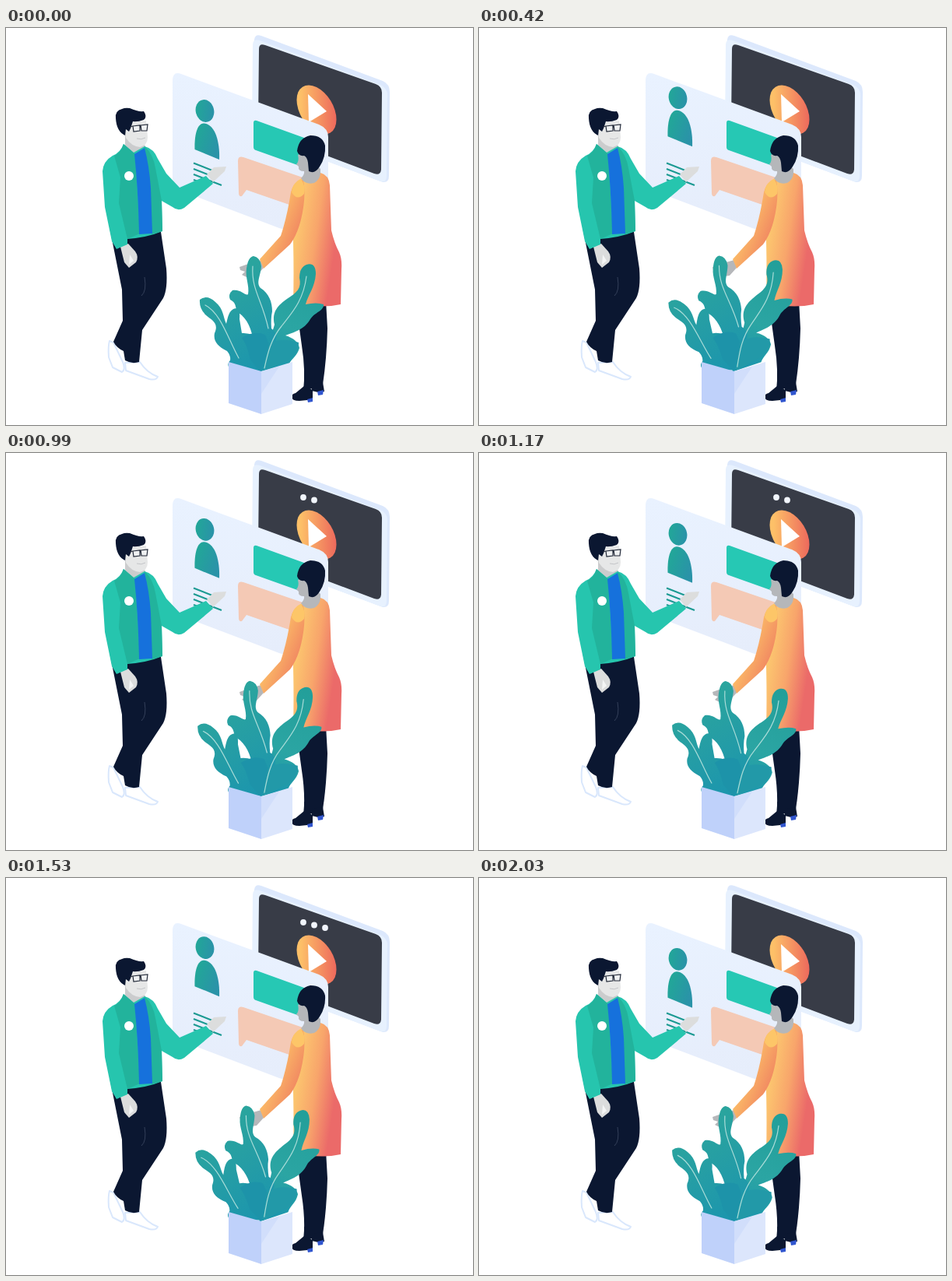
Write an HTML page that moves like this. It is 600 px wide and 510 px high and loops after 2090 ms.

```html
<!DOCTYPE html>
<html lang="en">
<head>
<meta charset="utf-8">
<title>Presentation</title>
<style>
html, body { margin: 0; width: 100%; height: 100%; overflow: hidden; background: #fff; }
svg { display: block; width: 100%; height: 100%; }
.navy { fill: #0b1731; }
.skin { fill: #dcdddd; }
.shade { fill: #b5b7ba; }
.vein { fill: none; stroke: #a9dcd8; stroke-width: 1.2; stroke-linecap: round; }
</style>
</head>
<body>
<svg viewBox="0 0 600 510">
  <defs>
    <linearGradient id="play" x1="0" y1="0" x2="1" y2="0">
      <stop offset=".1" stop-color="#fdc068"/><stop offset="1" stop-color="#ed695c"/>
    </linearGradient>
    <linearGradient id="avatarFill" x1="0" y1="0" x2="1" y2=".5">
      <stop offset=".1" stop-color="#21a897"/><stop offset="1" stop-color="#2a93a8"/>
    </linearGradient>
    <linearGradient id="dress" gradientUnits="userSpaceOnUse" x1="366" y1="255" x2="432" y2="265">
      <stop offset=".1" stop-color="#fcc76f"/><stop offset=".5" stop-color="#f8a56b"/><stop offset=".9" stop-color="#eb6a69"/>
    </linearGradient>
    <linearGradient id="sleeve" gradientUnits="userSpaceOnUse" x1="345" y1="240" x2="384" y2="256">
      <stop offset="0" stop-color="#fcbf67"/><stop offset="1" stop-color="#f08261"/>
    </linearGradient>
    <linearGradient id="leaf" gradientUnits="userSpaceOnUse" x1="270" y1="310" x2="340" y2="435">
      <stop offset="0" stop-color="#2ba69c"/><stop offset=".5" stop-color="#259da5"/><stop offset="1" stop-color="#1b95ae"/>
    </linearGradient>
    <linearGradient id="leafRight" gradientUnits="userSpaceOnUse" x1="390" y1="310" x2="335" y2="430">
      <stop offset="0" stop-color="#239f9a"/><stop offset=".6" stop-color="#2ba5a3"/><stop offset="1" stop-color="#1d97ac"/>
    </linearGradient>
    <linearGradient id="glass" x1="0" y1="0" x2="0" y2="1">
      <stop offset="0" stop-color="#e9f2ff"/><stop offset="1" stop-color="#e6edfb"/>
    </linearGradient>
  </defs>

  <g id="screen">
    <path fill="#dce8fc" d="M319 15Q320 7 328 10L484 68Q493 72 493 82L492 190Q492 199 484 198L322 137Z"/>
    <path fill="#e7f1fe" d="M317 22Q317 13 326 16L481 73Q490 77 490 86L489 190Q489 199 481 197L322 137Q316 134 316 127Z"/>
    <path fill="#383c47" d="M325 27Q325 19 333 22L475 72Q483 75 483 83L482 182Q481 190 473 187L330 133Q324 130 324 124Z"/>
    <circle r="1" fill="url(#play)" transform="matrix(25.5 12.5 0 29 399 105)"/>
    <path fill="#fff" d="M388 85L412 107L389 121Z"/>
    <g id="dots" fill="#f1f5fc">
      <circle cx="382" cy="57" r="3.9"/><circle cx="396" cy="60.5" r="3.9"/><circle cx="410" cy="64" r="3.9"/>
    </g>
  </g>

  <g id="panel">
    <path fill="url(#glass)" d="M214 68Q214 55 225 59L402 124Q414 129 414 140V244L366 252Q363 261 351 257L222 208Q214 204 214 194Z"/>
    <path fill="#26c8b4" d="M318 122Q318 118 322 119L394 145V183L321 157Q318 156 318 153Z"/>
    <path fill="#f4c9b5" d="M298 171Q298 164 305 166L390 195V236L309 208L303 216Q299 217 299 212Z"/>
    <path fill="none" stroke="#1b9a92" stroke-width="2.200" d="M241 173.500L265 183M241 181L268 191.500M241 188L277 202M241 195L249 198"/>
    <g id="avatar" fill="url(#avatarFill)">
      <ellipse cx="255.500" cy="106.500" rx="11.700" ry="14.500" transform="rotate(-14 255.500 106.500)"/>
      <path d="M242.500 156C242 142 244 123 254 122.500C268 123 275 145 274 169Z"/>
    </g>
  </g>

  <g id="woman">
    <path class="shade" d="M328 298L314 302L300 307L301 311L307 313L303 317L309 320L322 318L331 308Z"/>
    <path class="navy" d="M372 350H411L413 386Q412 425 407 458L394 463L382 466Q385 440 380 408Z"/>
    <path class="navy" d="M367 474Q367 470 372 469L383 460L394 465V477L387 478L377 479Q367 479 367 474ZM393 457L407 455L409 467L401 468L393 466Z"/>
    <path fill="#3156cf" d="M387 477L394 475V480L388 481ZM400 467L408 465L407 471L401 472Z"/>
    <path fill="url(#dress)" d="M380 193Q394 190 404 186Q415 189 416 202L418 260Q422 277 428 288Q432 297 431 310L430 355Q403 361 369 353Q370 315 369 275L366 213Q368 198 380 193Z"/>
    <path fill="url(#sleeve)" d="M366 211Q370 196 382 195Q386 217 379 246Q374 266 365 278L331 309L326 297L353 267Q361 243 366 211Z"/>
    <path fill="#fdc668" d="M367 211Q367 201 379 194Q385 202 383 213Q374 223 367 211Z"/>
    <path class="shade" d="M375 163Q384 158 396 174L404 181V187Q403 195 396 199Q385 202 379 193Q384 188 383 184Q375 184 376 178L373 175Q377 171 375 163Z"/>
    <path class="navy" d="M374 158Q376 141 391 138Q407 138 410 151Q411 166 403 178Q397 188 389 184L388 173Q387 166 383 164Q376 165 374 158Z"/>
  </g>

  <g id="plant">
    <path fill="url(#leafRight)" d="M388 303.500Q398 302 398 316C397 333 388 343 385 355Q399 352 408 355C409 363 397 365 391 374C383 388 369 391 359 395Q375 400 377 411C374 422 366 425 363 433L325 443L333 403Q343 391 345 381C341 364 350 356 361 348C374 340 380 334 377 321Q377 306 388 303.500Z"/>
    <path fill="url(#leaf)" d="M249 349Q258 342 269 352C280 361 279 372 283 380C285 373 286 360 297 360Q301 362 300 374L303 392Q318 391 325 402L330 441L293 440C284 437 284 431 288 427Q289 421 284 415C272 409 266 402 268 392C274 379 264 375 257 369Q248 361 249 349Z"/>
    <path fill="url(#leaf)" d="M318 293Q327 295 328 306C327 319 321 327 327 334C338 341 342 352 342 364Q340 373 341 386Q349 392 347 401L328 442L318 403C316 388 310 373 299 366C293 361 298 354 288 349Q285 342 291 337C302 335 308 345 311 342C313 331 307 320 309 309Q311 294 318 293Z"/>
    <path fill="#1d93a9" d="M303 398Q319 388 333 394L339 410L327 442L314 426Q309 405 303 398Z"/>
    <path fill="#2299a8" d="M338 405Q355 397 376 404Q377 415 366 425L329 442Z"/>
    <path class="vein" d="M317 306C315 336 329 349 337 386M256 356C276 366 286 401 299 424M386 319C382 351 367 366 354 383C340 400 336 419 332 437"/>
  </g>
  <path fill="#bfd1fa" d="M286 429L328 441V496L286 482Z"/>
  <path fill="#dce6fc" d="M328 441L368 429V483L328 496Z"/>
  <path fill="#d1defb" d="M328 470L351 435L328 441Z"/>

  <g id="man">
    <g fill="#fff" stroke="#d9e7fc" stroke-width="2" stroke-linejoin="round">
      <path d="M133 402Q131 408 132 423L137 436L149 442Q154 439 150 429L138 404Z"/>
      <path d="M153 430L172 429Q181 443 195 448Q193 453 184 451L154 440Z"/>
    </g>
    <path class="navy" d="M133 256L199 262L206 309Q208 335 202 347L175 388L171 429Q162 432 153 427L151 415Q142 411 138 403L150 376L149 336Z"/>
    <path fill="none" stroke="#34405a" d="M178 320Q181 338 174 344"/>
    <path class="skin" d="M147 281L157 277L166 287Q171 294 167 301L158 308L152 301Z"/>
    <path fill="#f4f5f5" d="M159 291L164 299L158 304Z"/>
    <path fill="#cbcccd" d="M153 132L166 143L179 151L177 159L165 162L153 153Z"/>
    <path fill="#26c5ae" d="M151 149L164 160L178 152Q190 155 195 168L206 187L223 205L257 190L266 200L229 231Q221 236 214 230L200 222L201 261Q182 269 156 271V278L142 284L136 274L127 230L124 184Q125 171 137 164Q147 160 151 149Z"/>
    <path fill="#22b39c" d="M151 149L166 162L172 264L156 271L145 225L147 192L139 164Q148 160 151 149ZM178 152Q189 162 192 180L200 222L201 261L187 265Z"/>
    <path fill="#1671dc" d="M165 162L178 154Q184 177 186 205L188 264L171 265Q170 210 165 162Z"/>
    <circle cx="158" cy="190" r="6" fill="#fff"/>
    <path class="skin" d="M258 188L267 179L283 178L281 184L266 198Z"/>
    <path fill="#e6e7e7" d="M153 126L161 121L180 119L182 140Q182 151 172 153Q161 152 154 141Z"/>
    <path fill="none" stroke="#c3c5c8" d="M168 142Q174 144 179 141"/>
    <path class="navy" d="M141 116Q140 106 149 104Q153 102 159 103Q170 108 177 107Q182 114 177 118Q169 121 163 120L160 129L158 133L154 130L153 138Q142 133 141 116Z"/>
    <path fill="#eef0f1" stroke="#222938" stroke-width="1.200" d="M159 127L163 126L172 125V132L164 133L163 126M173 125L182 124L181 132L174 132ZM172 127H174"/>
  </g>
</svg>
<script>
const LOOP = 2090;
const PIVOT = "327 440";
const TILT = -3.7;
const PLANT_LIFT = -1.5;
const AVATAR_LIFT = -17;
// Time in ms and pose: 1 leans right with the figure low, 0 leans left with it raised.
const POSES = [[0, 1], [60, 1], [450, 0], [760, 0], [1170, .87], [1230, .87], [1550, 0], [1780, 0], [2030, .87], [LOOP, .87]];
const DOTS_ON = [660, 960, 1260];
const DOTS_OFF = 1680;

const avatar = document.getElementById("avatar");
const plant = document.getElementById("plant");
const dots = [...document.getElementById("dots").children];

const ease = x => (1 - Math.cos(Math.PI * x)) / 2;

function poseAt(time) {
  const next = POSES.findIndex(([end]) => end > time);
  const [start, from] = POSES[next - 1];
  const [end, to] = POSES[next];
  return from + (to - from) * ease((time - start) / (end - start));
}

function draw(now) {
  const time = now % LOOP;
  const away = 1 - poseAt(time);
  avatar.setAttribute("transform", `translate(0 ${AVATAR_LIFT * away})`);
  plant.setAttribute("transform", `translate(0 ${PLANT_LIFT * away}) rotate(${TILT * away} ${PIVOT})`);
  dots.forEach((dot, i) => {
    const visible = time >= DOTS_ON[i] && time < DOTS_OFF;
    dot.setAttribute("visibility", visible ? "visible" : "hidden");
  });
}

const startTime = performance.now();
function tick() {
  draw(performance.now() - startTime);
  requestAnimationFrame(tick);
}
tick();
</script>
</body>
</html>
```
